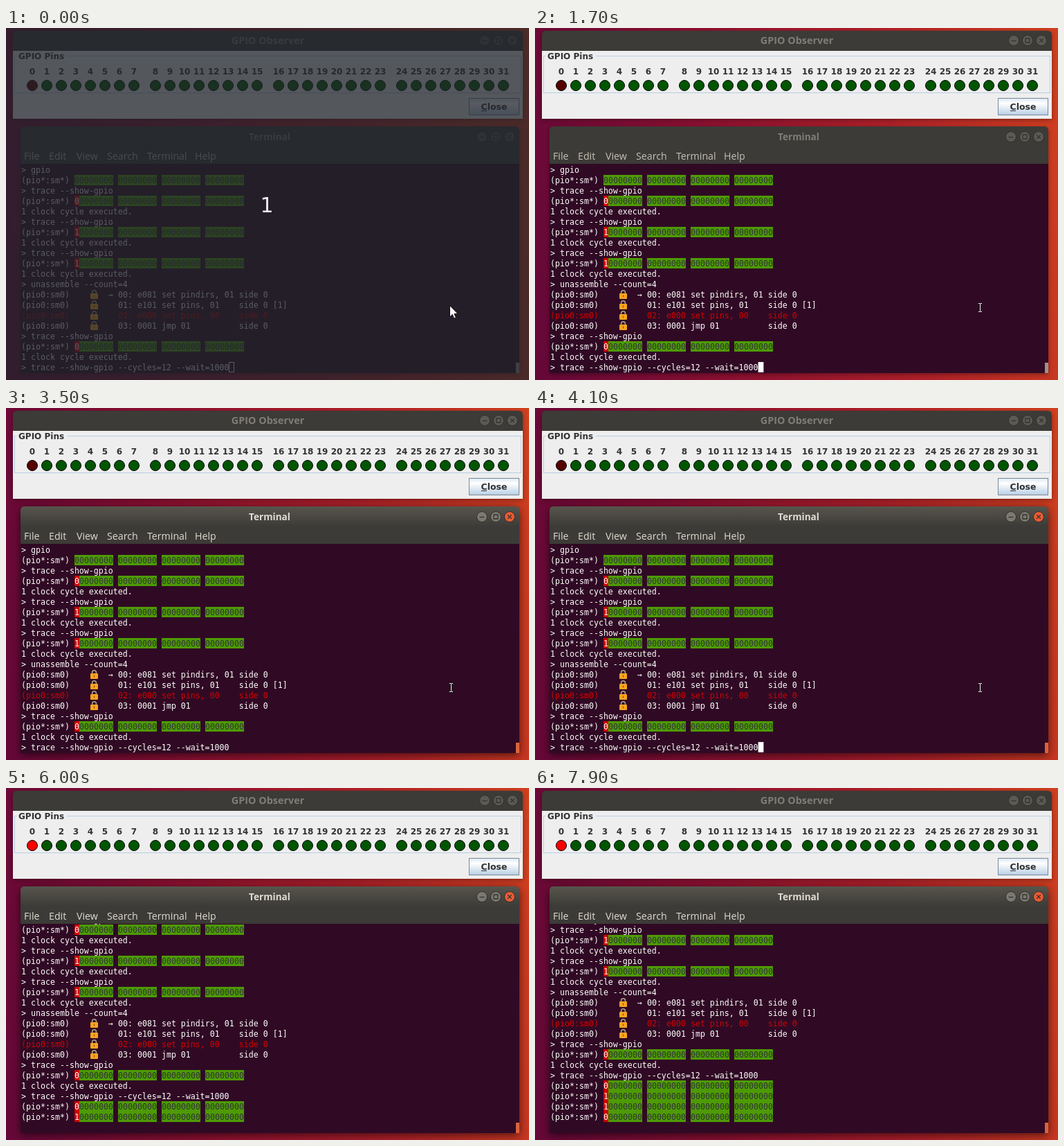
Write an HTML page that moves like this. It is 756 px wide and 508 px high and loops after 8 s.

```html
<!DOCTYPE html>
<html lang="en">
<head>
<meta charset="utf-8">
<title>GPIO Observer</title>
<style>
html, body { margin: 0; width: 756px; height: 508px; overflow: hidden; }
body { position: relative; background: linear-gradient(82deg, #640839 0%, #8c1031 35%, #ae2029 68%, #d0401f 100%); }
svg { position: absolute; left: 0; top: 0; display: block; }
text { white-space: pre; }
.shade { position: absolute; border-radius: 6px 6px 0 0; box-shadow: 0 2px 6px rgba(0,0,0,.35); }
.focus #termShade { box-shadow: 0 3px 13px rgba(0,0,0,.6); }
.title { font: 700 14px "Open Sans", "Noto Sans", sans-serif; fill: #807d78; text-anchor: middle; }
.menu { font: 14.2px "Open Sans", "Noto Sans", sans-serif; fill: #c5c1b8; }
.java { font: 700 12px "DejaVu Sans", sans-serif; fill: #333; }
.mid { text-anchor: middle; }
.mono { font: 11.627px "DejaVu Sans Mono", monospace; fill: #fff; }
.mono .dark { fill: #2e3436; }
.mono .red { fill: #d40000; }
.btn circle { fill: #5c5a54; stroke: #32312d; }
.btn path { fill: none; stroke: #35342f; stroke-width: 1.3; }
#thumb { fill: #99928f; }
#glow { opacity: 0; }
.focus #glow { opacity: 1; }
.focus #term .title, .focus .menu { fill: #dfdbd2; }
.focus #term .btn circle { fill: #7b7970; }
.focus #term .btn.close circle { fill: #ea5a34; }
.focus #thumb { fill: #d9643c; }
</style>
</head>
<body>
<div class="shade" style="left:10px;top:4px;width:737px;height:127px"></div>
<div class="shade" id="termShade" style="left:21px;top:142px;width:721px;height:356px"></div>
<svg id="stage" width="756" height="508" viewBox="0 0 756 508"></svg>
<script>
const LOOP = 8000, ROW = 15, COL = 7, LEFT = 22, TOP = 197, ROWS = 20;

const rect = (x, y, w, h, fill, more = '') =>
  `<rect x="${x}" y="${y}" width="${w}" height="${h}" fill="${fill}" ${more}/>`;
const text = (x, y, str, cls = '', more = '') =>
  `<text x="${x}" y="${y}" class="${cls}" ${more}>${str.replace(/>/g, '&gt;')}</text>`;
const colX = c => LEFT + c * COL;

function bar(x, y, w, h) {
  return `M${x} ${y + h}V${y + 6}q0 -6 6 -6H${x + w - 6}q6 0 6 6V${y + h}z`;
}

function buttons(x, y) {
  const icons = ['M-3.5 0.5H3.5', 'M-3 -3H3V3H-3z', 'M-2.8 -2.8L2.8 2.8M2.8 -2.8L-2.8 2.8'];
  return icons.map((d, i) =>
    `<g class="btn ${i === 2 ? 'close' : ''}" transform="translate(${x + 20 * i} ${y})"><circle r="7.5"/><path d="${d}"/></g>`
  ).join('');
}

// Observer window
function observer() {
  let s = `<path d="${bar(10, 4, 737, 29)}" fill="#3c3b37"/>` +
    text(378.5, 23, 'GPIO Observer', 'title', 'style="font-size:14.4px"') + buttons(692, 18) +
    rect(10, 33, 737, 98, '#eee') +
    rect(12.5, 40.5, 732, 53, 'none', 'stroke="#b8cfe5"') +
    rect(16, 35, 72, 12, '#eee') + text(18, 45, 'GPIO Pins', 'java');
  for (let i = 0; i < 32; i++) {
    const x = 38 + 21 * i + 10 * Math.floor(i / 8);
    s += text(x, 67, String(i), 'java mid') +
      `<circle ${i ? '' : 'id="pin0"'} cx="${x}" cy="83" r="7.5" fill="#005600" stroke="#000"/>`;
  }
  return s + rect(669.5, 101.5, 72, 24, 'url(#metal)', 'stroke="#7a8a99"') +
    text(705.5, 118, 'Close', 'java mid', 'style="font-size:12.5px"') +
    rect(687, 119, 8, 1, '#333');
}

// Terminal lines
const cmd = str => y => text(LEFT, y + 12, '> ' + str);
const note = y => text(LEFT, y + 12, '1 clock cycle executed.');

const pins = bit => y => {
  let s = text(LEFT, y + 12, '(pio*:sm*)');
  for (let k = 0; k < 4; k++) {
    const x = colX(11 + 9 * k), first = k === 0;
    s += rect(x, y, 8 * COL, ROW, '#4e9a06');
    if (first) s += rect(x, y, COL, ROW, '#cc0000') + text(x, y + 12, String(bit));
    s += text(first ? x + COL : x, y + 12, '0'.repeat(first ? 7 : 8), 'dark');
  }
  return s;
};

const lock = y => `<g transform="translate(122 ${y})">
  <path d="M2.6 7V4.6a2.9 2.9 0 0 1 5.8 0V7" fill="none" stroke="#b3a68c" stroke-width="1.5"/>
  ${rect(0, 6, 11, 8, '#fba31f', 'rx="1"')}${rect(5, 8.5, 1, 3, '#7a4a10')}</g>`;

const code = (str, mark, cls = '') => y =>
  text(LEFT, y + 12, '(pio0:sm0)', cls) + lock(y) +
  (mark ? text(colX(18), y + 12, '→') : '') + text(colX(20), y + 12, str, cls);

const trace = cmd('trace --show-gpio');
const step = bit => [trace, pins(bit), note];
const lines = [
  cmd('gpio'), y => pins(0)(y).replace('#cc0000', '#4e9a06').replace('>0</text>', ' style="fill:#2e3436">0</text>'),
  ...step(0), ...step(1), ...step(1),
  cmd('unassemble --count=4'),
  code('00: e081 set pindirs, 01 side 0', true),
  code('01: e101 set pins, 01    side 0 [1]'),
  code('02: e000 set pins, 00    side 0', false, 'red'),
  code('03: 0001 jmp 01          side 0'),
  ...step(0),
  cmd('trace --show-gpio --cycles=12 --wait=1000'),
  pins(0), pins(1), pins(1), pins(0)
];

function terminal() {
  const menu = [[26, 'File'], [62, 'Edit'], [102, 'View'], [146, 'Search'], [204, 'Terminal'], [273, 'Help']];
  return `<g id="term"><path d="${bar(21, 142, 721, 54)}" fill="#3c3b37"/>
    <path id="glow" d="${bar(21, 142, 721, 29)}" fill="url(#warm)"/>` +
    text(381, 162, 'Terminal', 'title', 'style="font-size:13.6px"') + buttons(688, 157) +
    menu.map(([x, str]) => text(x, 190, str, 'menu')).join('') +
    rect(21, 196, 721, 302, '#300a24') +
    `<g clip-path="url(#view)"><g id="log" class="mono">` +
    lines.map((draw, i) => `<g>${draw(TOP + ROW * i)}</g>`).join('') + `</g></g>` +
    rect(0, 482.5, 7, 14, '#fff', 'id="caret" stroke="#fff"') +
    rect(737, 483, 5, 15, '', 'id="thumb"').replace('fill=""', '') + `</g>`;
}

document.getElementById('stage').innerHTML = `<defs>
  <linearGradient id="metal" x2="0" y2="1"><stop stop-color="#dde8f3"/><stop offset=".3" stop-color="#fff"/>
    <stop offset="1" stop-color="#b8cfe5"/></linearGradient>
  <linearGradient id="warm" x2="0" y2="1"><stop stop-color="#57554c"/><stop offset="1" stop-color="#3c3b37"/></linearGradient>
  <clipPath id="view"><rect x="21" y="196" width="721" height="302"/></clipPath></defs>` +
  observer() + terminal() +
  `<g id="beam" fill="none"><path d="M641 397.5h2l.5 .5 .5 -.5h2M643.5 398V409M641 409.5h2l.5 -.5 .5 .5h2" stroke="#000" stroke-width="2.4" opacity=".6"/>
    <path d="M641 397.5h2l.5 .5 .5 -.5h2M643.5 398V409M641 409.5h2l.5 -.5 .5 .5h2" stroke="#fff"/></g>
  <g id="dim">${rect(0, 0, 756, 508, '#21252b', 'opacity=".75"')}
    ${text(367.5, 266, '1', '', 'style="font:30px \'DejaVu Sans\',sans-serif" fill="#ececec"')}
    <path d="M641.5 400.5V417l3.8 -3.6 2.4 5.8 2.7 -1.2 -2.4 -5.6h5z" fill="#fff" stroke="#111"/></g>`;

// Each track: [start ms, value] pairs
const tracks = {
  dim: [[0, 1], [100, 0]],
  beam: [[0, 0], [100, 1], [4200, 0]],
  focus: [[0, 0], [1800, 1]],
  scroll: [[0, 0], [4200, 1], [4700, 2], [6000, 3], [6700, 4], [7700, 5]],
  caret: [[0, 'box'], [1700, 'on'], [2300, ''], [2900, 'on'], [3500, ''], [4100, 'on'], [4200, ''],
    [4900, 'on'], [5400, ''], [6100, 'on'], [6700, ''], [7200, 'on'], [7900, '']],
  lit: [[0, 0], [6000, 1]]
};
const at = (name, t) => tracks[name].reduce((v, [start, next]) => t >= start ? next : v, 0);

const el = id => document.getElementById(id);
const log = el('log'), caret = el('caret');
const show = (node, on) => { node.style.display = on ? '' : 'none'; };

function draw(t) {
  const scroll = at('scroll', t), mode = at('caret', t);
  show(el('dim'), at('dim', t));
  show(el('beam'), at('beam', t));
  document.body.classList.toggle('focus', !!at('focus', t));
  el('pin0').setAttribute('fill', at('lit', t) ? '#fa0000' : '#560000');
  log.setAttribute('transform', `translate(0 ${-ROW * scroll})`);
  [...log.children].forEach((g, i) => show(g, i < Math.max(ROWS, scroll + ROWS - 1)));
  show(caret, mode);
  caret.setAttribute('x', (scroll ? LEFT : colX(43)) - (mode === 'box' ? 0.5 : 0));
  caret.setAttribute('fill', mode === 'on' ? '#fff' : 'none');
  caret.setAttribute('stroke-width', mode === 'on' ? 0.8 : 1);
}

const begin = performance.now();
function tick() {
  draw((performance.now() - begin) % LOOP);
  requestAnimationFrame(tick);
}
tick();
</script>
</body>
</html>
```
